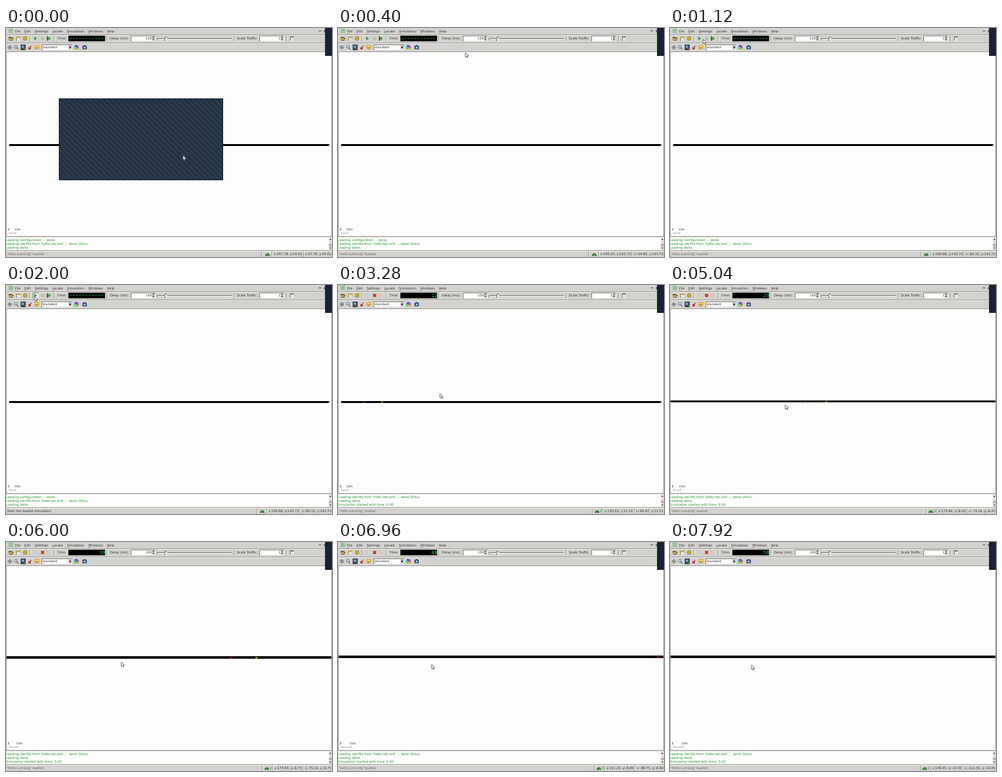
These frames come from a looping animation (512x361 px, 8000 ms). An HTML page with a canvas:

```html
<!DOCTYPE html>
<html lang="en">
<head>
<meta charset="utf-8">
<title>Traffic simulation</title>
<style>
html, body { margin: 0; width: 100%; height: 100%; overflow: hidden; background: #d4d2ce; }
canvas { display: block; width: 512px; height: 361px; }
</style>
</head>
<body>
<canvas id="stage" width="512" height="361"></canvas>
<script>
const LOOP = 8000, SIM_START = 2080, STEP = 100;
const GREY = '#d4d2ce', EDGE = '#9c9b98', LIGHT = '#eeeeec', INK = '#303030', PAPER = '#fdfdfd';
const GREEN = '#22922a';
const c = document.getElementById('stage').getContext('2d');

// Pointer stops: time, world x and y in metres
const STOPS = [
  [360, 273, -18],
  [400, 195.20, 143.73],
  [560, 195.20, 143.73],
  [1200, 40, 165],
  [2160, 40, 165],
  [3240, 155.03, 11.51],
  [3700, 155.03, 11.51],
  [5040, 175.84, -6.45],
  [6000, 174.90, -6.75],
  [7600, 138.45, -10.05]
];
const WHEEL = [3760, 5300, 5500, 6480];

function box(x, y, w, h, fill) {
  c.fillStyle = fill;
  c.fillRect(x, y, w, h);
}

function disc(x, y, r, fill) {
  c.beginPath();
  c.arc(x, y, r, 0, 7);
  c.fillStyle = fill;
  c.fill();
}

function poly(fill, ...p) {
  c.beginPath();
  for (let i = 0; i < p.length; i += 2) c.lineTo(p[i], p[i + 1]);
  c.closePath();
  c.fillStyle = fill;
  c.fill();
}

// Triangles about a centre: one points right, the other up or down
const triRight = (x, y, w, h, fill) => poly(fill, x - w, y - h, x + w, y, x - w, y + h);
const triDown = (x, y, w, h, fill) => poly(fill, x - w, y - h, x + w, y - h, x, y + h);

function line(x1, y1, x2, y2, color, width = 1) {
  c.beginPath();
  c.moveTo(x1, y1);
  c.lineTo(x2, y2);
  c.strokeStyle = color;
  c.lineWidth = width;
  c.stroke();
}

function setFont(size, family = '"DejaVu Sans", sans-serif') {
  c.font = `${size}px ${family}`;
}

function text(s, x, y, fill = INK) {
  c.fillStyle = fill;
  c.fillText(s, x, y);
}

function clipped(x, y, w, h, paint) {
  c.save();
  c.beginPath();
  c.rect(x, y, w, h);
  c.clip();
  paint();
  c.restore();
}

function field(x, y, w, h, fill = '#fff') {
  box(x, y, w, h, '#7c7b79');
  box(x + 1, y + 1, w - 1, h - 1, LIGHT);
  box(x + 1, y + 1, w - 2, h - 2, fill);
}

function groove(x, y, w, h) {
  box(x, y, w, h, EDGE);
  if (w > h) box(x, y + 1, w, h, LIGHT);
  else box(x + 1, y, w, h, LIGHT);
}

function arrows(x, y, gap) {
  triDown(x, y - gap, 1.5, -1, '#222');
  triDown(x, y + gap, 1.5, 1, '#222');
}

function numberField(x, s) {
  field(x, 12, 39, 9);
  text(s, x + 33 - c.measureText(s).width, 18.3);
  box(x + 33, 13, 5, 7, GREY);
  arrows(x + 35.5, 16.5, 2);
}

// The wheel zooms about a fixed world point
function viewAt(t) {
  const zoom = 1.1 ** WHEEL.filter(w => w <= t).length;
  return { zoom, x: 5 - 172 * (zoom - 1), y: 184.5 - 6.5 * (zoom - 1) };
}

function pointerAt(t) {
  const next = STOPS.findIndex(s => s[0] > t);
  if (next === 0) return STOPS[0].slice(1);
  if (next < 0) return STOPS.at(-1).slice(1);
  const a = STOPS[next - 1], b = STOPS[next];
  const u = (t - a[0]) / (b[0] - a[0]);
  const ease = u * u * (3 - 2 * u);
  return [1, 2].map(i => a[i] + (b[i] - a[i]) * ease);
}

// The readout holds its last position while the pointer is off the map
function readout(t, [wx, wy]) {
  if (t < 360) return [297.78, 54.02];
  return wy > 145 ? [169.68, 143.73] : [wx, wy];
}

// Constant acceleration up to cruising speed
function travelled(age) {
  const top = 10, ramp = Math.min(age, top);
  return 6 + ramp * ramp / 2 + (age - ramp) * top;
}

function drawMenu() {
  box(0, 0, 512, 361, GREY);
  box(4, 1, 7, 7, '#8fc49a');
  let x = 14;
  for (const s of ['File', 'Edit', 'Settings', 'Locate', 'Simulation', 'Windows', 'Help']) {
    text(s, x, 7.2);
    box(x, 8, 3, 0.5, '#666');
    x += c.measureText(s).width + 6.4;
  }
  box(491, 4, 4, 1, '#444');
  box(499, 3, 2, 4, '#777');
  for (const y of [10, 23]) groove(0, y, 512, 1);
}

function drawTime(sim) {
  text('Time:', 80.5, 18.3);
  box(98, 12, 57.5, 9, '#000');
  if (sim < 0) {
    for (let x = 100; x < 154; x += 5) box(x, 16, 3, 1, '#1c9228');
    return;
  }
  setFont(7.2, '"DejaVu Sans Mono", monospace');
  const s = String(sim);
  text(s, 155.5 - c.measureText(s).width, 19.2, '#22d436');
  setFont(5.1);
}

function drawControls(sim, hover) {
  const running = sim >= 0, faded = '#cccac6';
  for (const x of [37, 75, 158, 358, 440]) groove(x, 12, 1, 9);

  poly('#6b5a1e', 4, 14, 8, 14, 12, 16, 10, 20, 5, 20);
  triRight(8.5, 17.5, 3, 2, '#dcc055');
  field(16, 14, 5, 6, '#e9e8da');
  box(19, 13, 4, 3, '#d2b53c');
  disc(30, 16.5, 3.2, '#8a7426');
  disc(30, 16.5, 2.3, '#e6ca48');
  disc(30, 16.5, 1, '#8a7426');

  if (hover) field(42, 12, 9, 10, LIGHT);
  const go = running ? faded : '#2d9238';
  triRight(46.5, 16.5, 2.2, 3, go);
  box(55, 14, 5, 5, running ? '#dc3a22' : '#bdbcb8');
  box(64, 13, 2, 7, running ? faded : '#376d3c');
  triRight(68.5, 16.5, 2.2, 3, go);

  drawTime(sim);
  text('Delay (ms):', 163, 18.3);
  numberField(196, '100');
  for (let x = 240; x < 354; x += 11.5) box(x, 13, 0.6, 1, '#b0afac');
  field(237, 16, 118, 3, GREY);
  field(249, 14, 4, 7, '#dfdeda');
  text('Scale Traffic:', 362.5, 17.8);
  numberField(398, '1');
  field(446, 13, 6, 7, '#e3e1dd');
  box(446, 13, 6, 2, '#77758a');
}

function drawViewTools() {
  c.strokeStyle = '#777';
  c.lineWidth = 0.8;
  c.strokeRect(4, 28.5, 4, 4);
  line(6, 27, 6, 34, '#666', 0.8);
  line(2.5, 30.5, 9.5, 30.5, '#666', 0.8);
  for (const [x, lens] of [[15.5, '#cfe2f1'], [26.5, '#8fa6c4']]) {
    if (x > 20) box(23, 26, 8, 9, '#39465f');
    line(x + 1, 31, x + 4, 34, '#8a6b35', 1.3);
    disc(x, 29.5, 2.6, '#46698f');
    disc(x, 29.5, 1.7, lens);
  }
  line(37, 31, 40, 28, '#d34b36', 1.4);
  disc(37, 32, 2, '#be2a22');
  box(45, 27, 7, 5.5, '#d2a529');
  box(46, 28, 5, 2, '#f4d866');
  triDown(47.5, 33, 1.5, 1.5, '#b4841e');

  field(56, 26, 48, 9);
  text('standard', 57.7, 32.3);
  box(98, 27, 5, 7, GREY);
  triDown(100.8, 31, 2, 1.4, '#111');
  for (let i = 0; i < 12; i++) {
    c.beginPath();
    c.moveTo(110.5, 30.5);
    c.arc(110.5, 30.5, 3.7, i * Math.PI / 6, (i + 1) * Math.PI / 6);
    c.fillStyle = `hsl(${i * 30} 75% 48%)`;
    c.fill();
  }
  box(120, 28, 7, 5.5, '#28527f');
  box(122, 27, 3, 1, '#28527f');
  disc(123.5, 30.7, 1.6, '#a9cde8');
}

function drawOverlay() {
  box(83, 111, 258, 129, '#111923');
  clipped(84, 112, 256, 127, () => {
    box(84, 112, 256, 127, '#253548');
    for (let x = -48; x < 345; x += 8.5) {
      line(x, 111, x + 130, 241, '#3c4d5b', 0.9);
      line(x + 4, 111, x + 134, 241, '#1d2a3c', 0.9);
    }
  });
}

function drawVehicle(view, age, color) {
  const place = travelled(age), size = view.zoom;
  if (age < 0 || place > 500) return;
  triRight(view.x + (place - 1) * size, view.y, 1.5 * size, size, color);
}

function drawScene(view, sim) {
  const { zoom, x, y } = view;
  const thick = Math.round(3 * zoom);
  box(0, 37, 512, 292, EDGE);
  box(1, 38, 510, 290, PAPER);
  clipped(1, 38, 510, 290, () => {
    const top = Math.round(y - thick / 2);
    box(x, top, 503 * zoom, thick, '#000');
    box(x + 501 * zoom, top + 1, 2, thick - 1, '#2c8f37');
    drawVehicle(view, sim - 1, '#f2e529');
    drawVehicle(view, sim - 4, '#b81c16');
  });

  const end = Math.round(5 + 10 * zoom) + 0.5;
  setFont(4.6);
  text('0', 2.5, 318.8, '#111');
  text('10m', end - 2.5, 318.8);
  setFont(5.1);
  line(5, 323.5, end, 323.5, '#b0b0b0');
  for (const tick of [5.5, end]) line(tick, 321, tick, 324, '#b0b0b0');
}

function drawLog(running) {
  box(0, 329, 512, 1, GREY);
  box(0, 330, 507, 20, PAPER);
  const lines = ['Loading configuration ... done.', "Loading net-file from 'hello.net.xml' ... done (0ms).",
    'Loading done.', 'Simulation started with time: 0.00'];
  const first = running ? 1 : 0;
  lines.slice(first, first + 3).forEach((s, i) => text(s, 0, 336.4 + i * 6, GREEN));
  box(507, 330, 5, 20, '#e1e0dd');
  arrows(509.5, 340, 7);
  box(507, 340, 5, 4, '#b6b5b2');
  groove(0, 350, 512, 1);
}

function drawStatus(hover, sim, [wx, wy]) {
  text(hover ? 'Start the loaded simulation.' : "'hello.sumocfg' loaded.", 1.5, 357.6, hover ? '#333' : '#666');
  const label = x => `x:${x.toFixed(2)}, y:${wy.toFixed(2)}`;
  const net = label(wx), geo = label(wx - 250);
  const geoX = 511 - c.measureText(geo).width;
  const netX = geoX - 4.5 - c.measureText(net).width;
  for (const x of [netX - 18, netX - 2, geoX - 2]) groove(Math.round(x) - 1, 352, 1, 9);
  text(net, netX, 357.8);
  text(geo, geoX, 357.8);

  const count = (sim >= 1) + (sim >= 4);
  const x = netX - (count ? 11.5 : 9.5);
  poly('#3f8f45', x - 4, 359, x - 3, 356.5, x - 1, 355, x + 2, 355, x + 4, 359);
  for (const side of [-2, 2]) disc(x + side, 358.7, 0.8, '#23552a');
  if (count) text(count, netX - 7, 357.8, '#2a6b30');
}

function drawPointer(x, y) {
  c.save();
  c.translate(Math.round(x), Math.round(y));
  c.lineJoin = 'round';
  poly('#fff', 0, 0, 0, 6.8, 1.6, 5.4, 2.8, 8, 4, 7.4, 2.9, 5, 5, 4.8);
  c.strokeStyle = '#444';
  c.lineWidth = 0.8;
  c.stroke();
  c.restore();
}

function draw(t) {
  const running = t >= 2160;
  const sim = running ? Math.floor((t - SIM_START) / STEP) : -1;
  const hover = t >= 1200 && t < 2200;
  const view = viewAt(t), pointer = pointerAt(t);
  setFont(5.1);
  drawMenu();
  drawControls(sim, hover);
  drawViewTools();
  drawScene(view, sim);
  if (t < 360) drawOverlay();
  drawLog(running);
  drawStatus(hover, sim, readout(t, pointer));
  box(501, 0, 11, 44, '#1b2135');
  drawPointer(view.x + pointer[0] * view.zoom, view.y - 2 - pointer[1] * view.zoom);
}

function tick() {
  draw(performance.now() % LOOP);
  requestAnimationFrame(tick);
}
tick();
</script>
</body>
</html>
```
